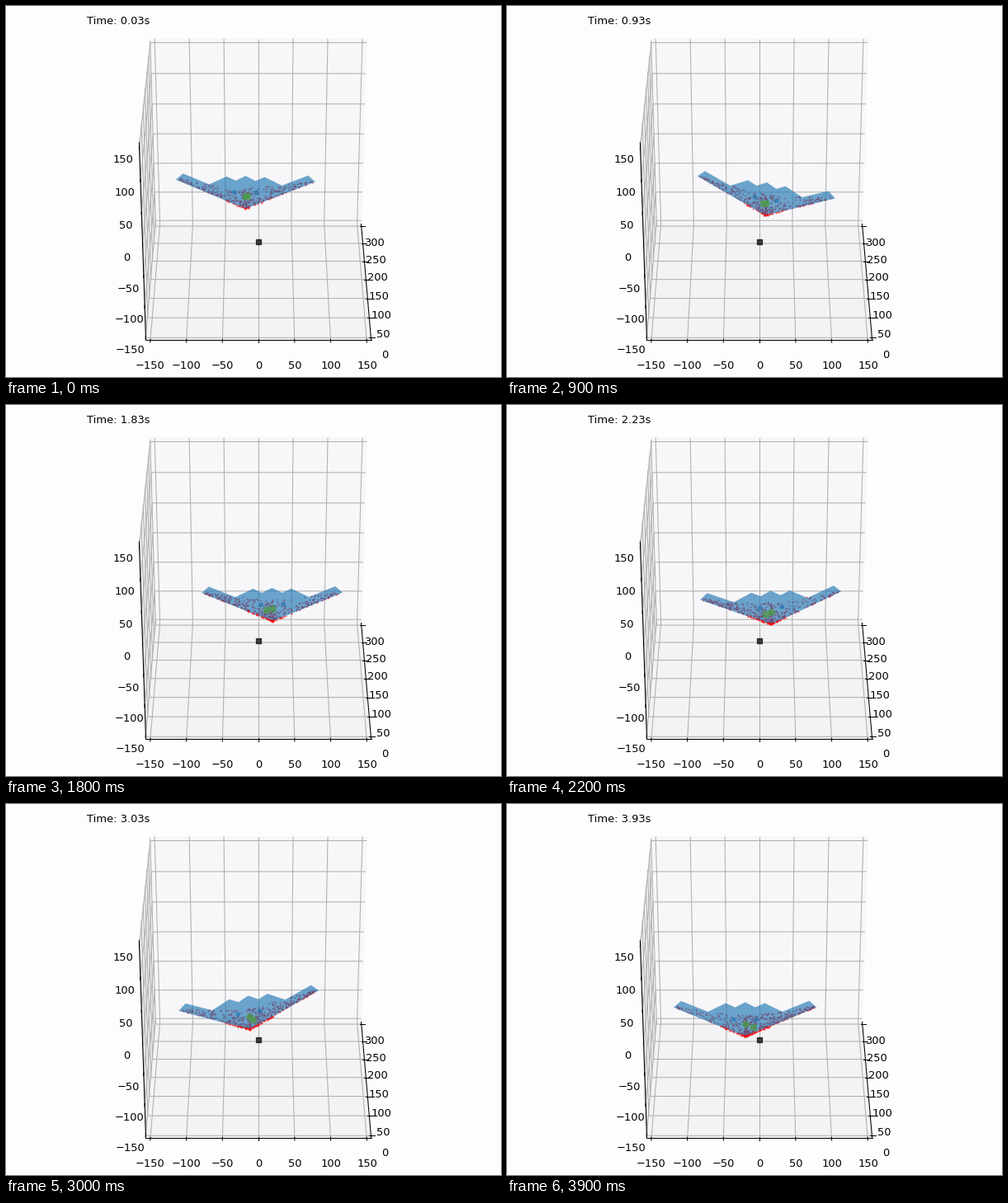
A matplotlib script for the animation above (4 s loop, 600 px wide and 450 px high).

```python
import numpy as np
import matplotlib.pyplot as plt
from matplotlib.animation import FuncAnimation
from mpl_toolkits.mplot3d.art3d import Poly3DCollection

FRAMES, STEP = 40, 0.1
HALF_SPAN, SWEEP = 98.9, 58.4
PITCH, PIVOT = 0.2, 35

# Right half of the planform: (sideways, distance behind the nose)
HALF = [(0, 0), (HALF_SPAN, SWEEP), (89, 71.6), (51.4, 49.6),
        (27, 67), (14, 58.4), (0, 68.8)]
WING = np.array(HALF + [(-x, b) for x, b in HALF[-2:0:-1]])
INTAKE = np.array([(12.5, 30), (18.5, 30), (18.5, 38), (12.5, 38)])
PARTS = [WING, INTAKE, INTAKE * (-1, 1)]

fig = plt.figure(figsize=(6.4, 4.8), dpi=93.75, facecolor="#fefdfe")
ax = fig.add_axes([0.125, 0, 0.75, 1], projection="3d", computed_zorder=False,
                  facecolor="#fefdfe")
ax.set_box_aspect((1, 1, 1))
ax.view_init(elev=30, azim=-90)
ax.set(xlim=(-156.25, 156.25), ylim=(-6.25, 306.25), zlim=(-156.25, 156.25),
       xticks=range(-150, 151, 50), yticks=range(0, 301, 50),
       zticks=range(-150, 151, 50))
ax.zaxis.set_ticks_position("lower")
for axis, shade in zip((ax.xaxis, ax.yaxis, ax.zaxis),
                       ("#f1f0f2", "#f7f6f8", "#f3f2f4")):
    axis.set_pane_color(shade)


def marker(shape, color, size, edge, alpha, zorder):
    return ax.plot([], [], [], shape, color=color, ms=size, mew=edge,
                   alpha=alpha, zorder=zorder)[0]


clock = ax.text2D(0.05, 0.95, "", transform=ax.transAxes)
sensor = marker("s", "black", 4.9, 1, 0.72, 6)
sensor.set_data_3d([0], [0], [0])
inner_hits = marker("o", "red", 1.4, 0, 0.85, 2)
wing = Poly3DCollection([np.zeros((3, 3))], facecolor="C0", alpha=0.65,
                        linewidth=0, zorder=3)
ax.add_collection3d(wing)
edge_hits = marker("o", "red", 1.4, 0, 0.6, 4)
centre = marker("o", "#4f9a4a", 5.2, 1.2, 0.75, 5)
estimate = marker("s", "#4f9a4a", 4.8, 1.2, 0.75, 5)


def sway(t):
    return 20 * (np.tanh((t - 0.72) / 0.43) - np.tanh((t - 2.69) / 0.43) - 1)


def bank(t):
    return (0.197 * np.exp(-((t - 0.8) / 0.5) ** 2)
            - 0.22 * np.exp(-((t - 2.77) / 0.5) ** 2))


def place(points, t):
    """Local wing coordinates to world coordinates at time t."""
    x, back = np.asarray(points, float).T
    z = PITCH * (back - PIVOT)
    c, s = np.cos(bank(t)), np.sin(bank(t))
    return np.column_stack([sway(t) + x * c + z * s,
                            100.3 - 20.4 * t + back,
                            z * c - x * s])


def span_samples(rng, n, t):
    """Positions along the leading edge, denser on the sensor's side."""
    right = 0.5 - 0.008 * sway(t) * (0.5 + 0.2 * t)
    side = np.where(rng.random(n) < right, 1, -1)
    return side * rng.random(n) ** 1.8


def hits(rng, n, t):
    u = 0.96 * span_samples(rng, n, t)
    depth = 3 + 38 * (1 - abs(u)) ** 1.2
    back = SWEEP * abs(u) + 2 + depth * rng.random(n) ** 1.7
    return np.column_stack([HALF_SPAN * u, back])


def front_hits(rng, n, t):
    u = 0.35 * span_samples(rng, n, t)
    back = SWEEP * abs(u) + rng.uniform(-0.6, 1.2, n)
    return np.column_stack([HALF_SPAN * u, back])


def update(i):
    t = 0.03 + i * STEP
    rng = np.random.default_rng(i)
    clock.set_text(f"Time: {t:.2f}s")
    wing.set_verts([place(p, t) for p in PARTS])
    inner_hits.set_data_3d(*place(hits(rng, 320 + 3 * i, t), t).T)
    edge_hits.set_data_3d(*place(front_hits(rng, 25 + 2 * i, t), t).T)
    x, y, z = place([(0, 25)], t).T
    centre.set_data_3d(x, y, z)
    estimate.set_data_3d(x * (0.8 - 0.1 * t), y - 2.4 * t, z)
    return clock, wing, inner_hits, edge_hits, centre, estimate


anim = FuncAnimation(fig, update, frames=FRAMES, interval=100,
                     init_func=lambda: update(0), repeat=True, repeat_delay=0)
plt.show()
```
